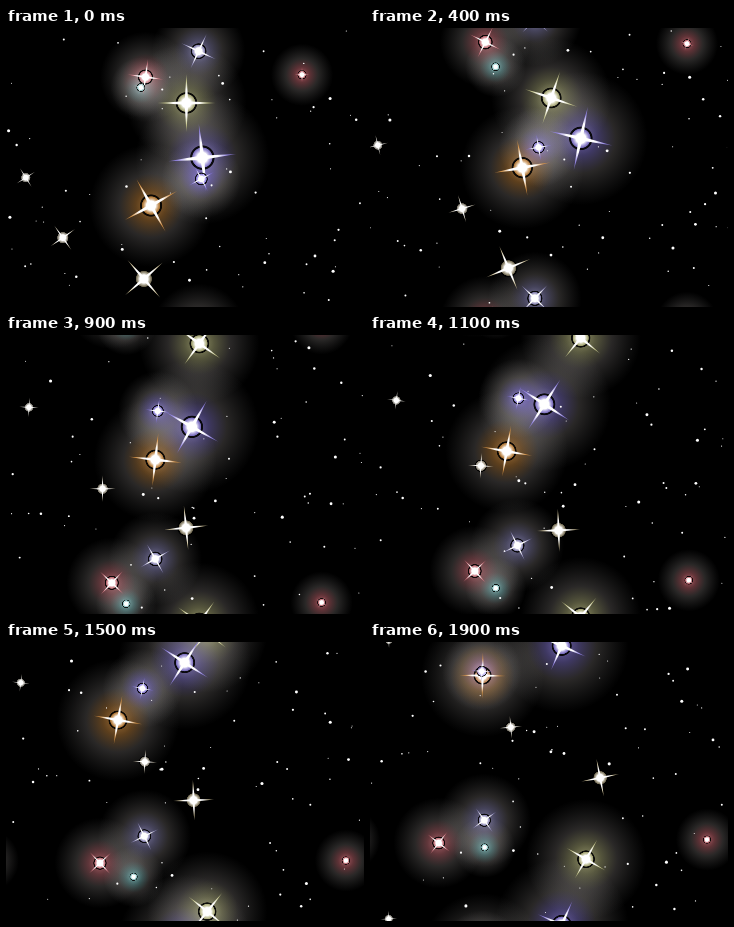
These frames come from a looping animation (358 px wide and 279 px high, 2 s). An HTML page with a canvas:

```html
<!DOCTYPE html>
<html lang="en">
<head>
<meta charset="utf-8">
<title>Drifting stars</title>
<style>
  html, body { margin: 0; width: 100%; height: 100%; overflow: hidden; background: #000; }
  canvas { display: block; }
</style>
</head>
<body>
<canvas id="sky" width="358" height="279"></canvas>
<script>
const W = 358, H = 279, STEP = 100, STEPS = 20, TURN = Math.PI * 2;
const ctx = document.getElementById('sky').getContext('2d');
const rad = deg => deg * Math.PI / 180;
const mod = (a, n) => ((a % n) + n) % n;

// Sideways drift (pixels per step) sets the climb and the orbit speed;
// ray length sets the orbit, ring and glow radii.
const star = (x, y, drift, phase, length, tilt, tint, glows = true) => ({
  x, y, drift, phase, length, tilt, tint, glows,
  orbit: 5 + .28 * length,
  glow: 21 + 1.35 * length
});

const stars = [
  star(191, 13, -4.2, 81, 19, 25, '165,160,215'),
  star(303, 48, 2, -170, 7.5, 0, '225,120,130'),
  star(140, 39, -3.7, 93, 18, 8, '230,130,140'),
  star(128, 61, -.4, -12, 7, 20, '140,215,215'),
  star(172, 85, 2.4, -50, 29, 0, '205,205,145'),
  star(202, 143, -1.3, -113, 34, -6, '150,135,235'),
  star(158, 181, -2.2, -165, 30, -29, '220,150,70'),
  star(195, 142, -4.5, 88, 14, -28, '140,125,240'),
  star(127, 256, 4.8, -25, 25, -41, '225,210,165', false),
  star(14, 144, .4, 44, 11, -32, '225,220,205', false),
  star(66, 210, 4.4, -178, 15, -35, '225,215,190', false)
];

let seed = 41;
const random = () => (seed = (seed * 16807) % 2147483647) / 2147483647;

const dots = Array.from({ length: 66 }, () => ({
  x: random() * W, y: random() * H, drift: random() * 10 - 5,
  phase: random() * 360, orbit: 4 + random() * 4, size: .5 + random() ** 2 * 1.1
}));

function place({ x, y, drift, phase, orbit }, n) {
  const climb = 7.3 - .045 * drift * drift;
  const spin = 28.5 + 10.5 * Math.sin(.3 * drift);
  const a = rad(phase + spin * n);
  return [mod(x + drift * n + orbit * Math.cos(a), W), mod(y - climb * n + orbit * Math.sin(a), H)];
}

// Draws at the wrapped position, plus copies wherever the reach crosses an edge.
function tiled([x, y], reach, draw) {
  for (const px of [x - W, x, x + W])
    for (const py of [y - H, y, y + H]) {
      if (px < -reach || px > W + reach || py < -reach || py > H + reach) continue;
      ctx.save();
      ctx.translate(px, py);
      draw();
      ctx.restore();
    }
}

function gradient(radius, stops) {
  const g = ctx.createRadialGradient(0, 0, 0, 0, 0, radius);
  for (const [at, colour] of stops) g.addColorStop(at, colour);
  return g;
}

function disc(radius, fill) {
  ctx.fillStyle = fill;
  ctx.beginPath();
  ctx.arc(0, 0, radius, 0, TURN);
  ctx.fill();
}

function drawGlow(s) {
  disc(s.glow, gradient(s.glow, [
    [0, `rgba(${s.tint},.72)`],
    [.25, `rgba(${s.tint},.42)`],
    [.52, 'rgba(115,110,108,.36)'],
    [1, 'rgba(90,90,90,0)']
  ]));
}

function drawStar(s, n) {
  const length = s.length * (1 - .012 * n);
  const ring = 2.5 + .3 * length;
  disc(ring, gradient(ring, [
    [0, '#fff'], [.4, '#fff'], [.76, `rgba(${s.tint},.5)`],
    [.82, 'rgba(0,0,0,.9)'], [.93, 'rgba(0,0,0,.9)'], [1, 'rgba(0,0,0,0)']
  ]));

  ctx.rotate(rad(s.tilt + 40 * Math.sin(Math.PI * n / 26)));
  ctx.fillStyle = gradient(length, [
    [0, '#fff'], [.45, '#fff'], [.75, `rgba(${s.tint},.95)`], [1, `rgba(${s.tint},.5)`]
  ]);
  // Eight corners: long tips alternating with a narrow waist.
  ctx.beginPath();
  for (let k = 0; k < 8; k++) {
    const r = k % 2 ? length * .085 : length, a = k * TURN / 8;
    ctx.lineTo(r * Math.cos(a), r * Math.sin(a));
  }
  ctx.fill();
  disc(ring * .42, '#fff');
}

function render() {
  const n = Math.floor(performance.now() / STEP) % STEPS;
  ctx.globalCompositeOperation = 'source-over';
  ctx.fillStyle = '#000';
  ctx.fillRect(0, 0, W, H);

  ctx.globalCompositeOperation = 'screen';
  for (const s of stars) if (s.glows) tiled(place(s, n), s.glow, () => drawGlow(s));

  ctx.globalCompositeOperation = 'source-over';
  for (const d of dots) tiled(place(d, n), 2, () => disc(d.size, '#fff'));
  for (const s of stars) tiled(place(s, n), s.length, () => drawStar(s, n));

  requestAnimationFrame(render);
}
render();
</script>
</body>
</html>
```
